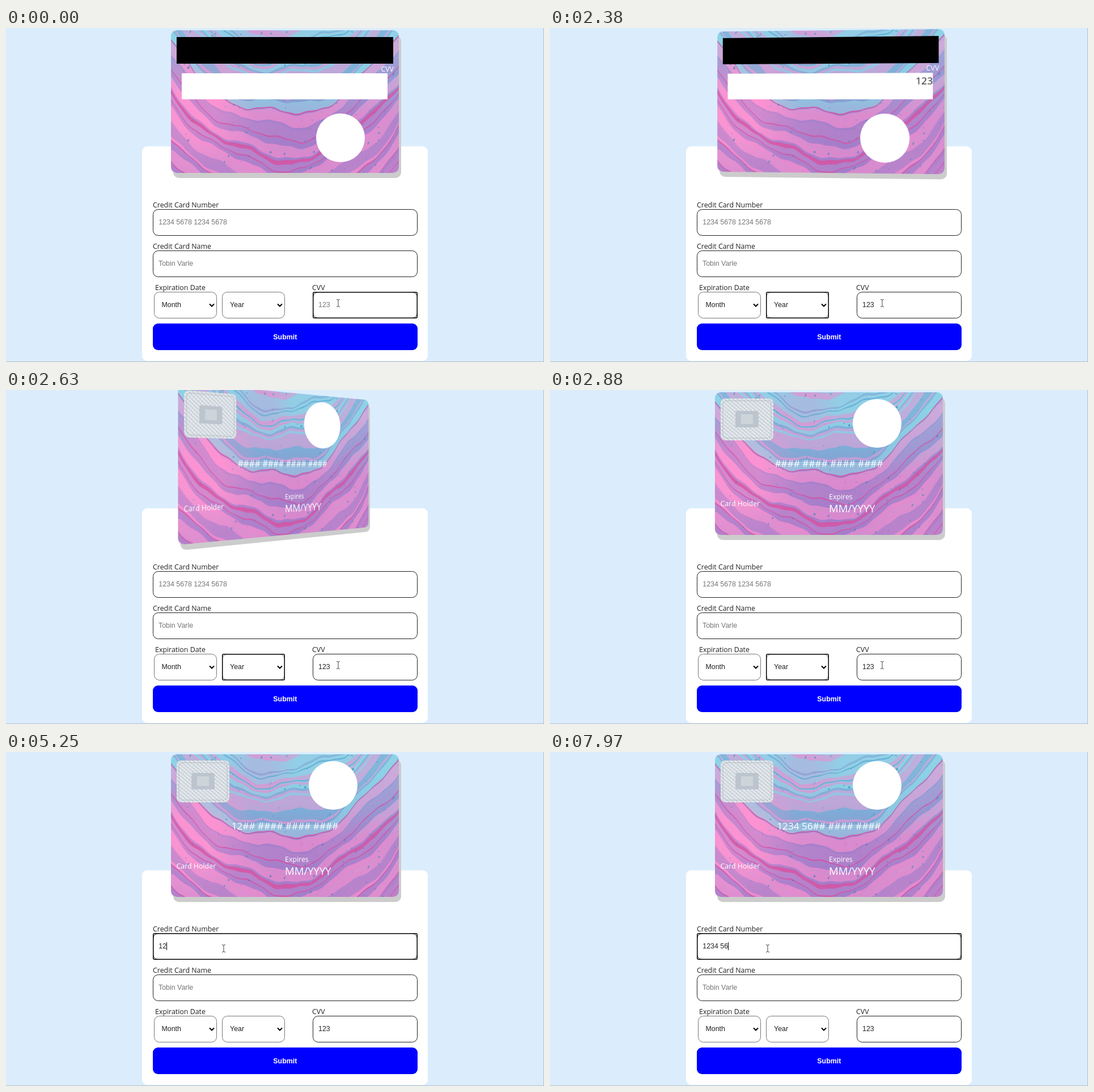
These frames come from a looping animation (949 by 590 pixels, 8 s). An HTML page with a canvas:

```html
<!DOCTYPE html>
<html lang="en">
<head>
<meta charset="utf-8">
<title>Card form</title>
<style>
html, body { margin: 0; width: 100%; height: 100%; overflow: hidden; background: #dbedfc; }
#stage { position: relative; width: 949px; height: 590px; overflow: hidden; }
#stage > svg { position: absolute; left: 0; top: 0; }
text { font: 12.4px "Liberation Sans", Arial, sans-serif; fill: #222; white-space: pre; }
.label, .face text { font-family: "Open Sans", "Noto Sans", sans-serif; }
.face text { fill: #fff; }
.face .big { font-size: 17.2px; }
.face .date { font-size: 18.5px; }
.hint { fill: #757575; }
.field { fill: #fff; stroke: #222; }
.select { stroke: #767676; }
.face {
  position: absolute; left: 291px; top: 4px; width: 402px; height: 252px;
  border-radius: 10px; box-shadow: 4px 9px #ccc; backface-visibility: hidden;
}
.face > * { position: absolute; left: 0; top: 0; border-radius: 10px; }
</style>
</head>
<body>
<div id="stage">
  <svg width="949" height="590">
    <rect x="240" y="209" width="504" height="379" rx="9" fill="#fff"/>
    <path d="M0 589.5H949M948.5 0V590" stroke="#b4bcc4"/>
    <text class="label" x="259" y="317">Credit Card Number</text>
    <text class="label" x="259" y="390">Credit Card Name</text>
    <text class="label" x="263" y="463">Expiration Date</text>
    <text class="label" x="540" y="463">CVV</text>
    <rect class="field" x="259.5" y="320.5" width="466" height="46" rx="9"/>
    <rect class="field" x="259.5" y="393.5" width="466" height="46" rx="9"/>
    <rect class="field select" x="261.5" y="466.5" width="110" height="46" rx="9"/>
    <rect class="field select" x="381.5" y="466.5" width="110" height="46" rx="9"/>
    <rect class="field" x="541.5" y="466.5" width="184" height="46" rx="9"/>
    <rect id="focus" height="45.5" rx="2" fill="none" stroke="#000" stroke-width="1.5"/>
    <text id="number" x="269.3" y="346.5"></text>
    <text class="hint" x="269" y="419.7">Tobin Varle</text>
    <text x="274.5" y="493">Month</text>
    <text x="395" y="493">Year</text>
    <text id="cvv" x="551" y="493"></text>
    <path d="M359 487.5l4 4 4-4M479 487.5l4 4 4-4" fill="none" stroke="#000" stroke-width="2"/>
    <rect x="259" y="522" width="467" height="47" rx="9" fill="#00f"/>
    <text x="492.3" y="549.5" text-anchor="middle" style="fill:#fff;font-weight:bold">Submit</text>
    <rect id="caret" width="1" height="14"/>
  </svg>

  <div class="face" id="back">
    <canvas width="402" height="252"></canvas>
    <svg width="402" height="252">
      <rect x="10" y="12" width="382" height="47"/>
      <text x="393" y="72.5" text-anchor="end">CVV</text>
      <rect x="19" y="76" width="363" height="46" fill="#fff"/>
      <text id="cardCvv" class="big" x="382" y="96" text-anchor="end" style="fill:#222"></text>
      <circle cx="299" cy="190" r="43" fill="#fff"/>
    </svg>
  </div>

  <div class="face" id="front">
    <canvas width="402" height="252"></canvas>
    <svg width="402" height="252" fill="none">
      <defs>
        <pattern id="hatch" width="5" height="5" patternUnits="userSpaceOnUse" patternTransform="rotate(40)">
          <rect width="5" height="5" fill="#cbd3da"/>
          <path d="M0 1H5M1 0V3" stroke="#edf0f3" stroke-width="1.5"/>
        </pattern>
      </defs>
      <rect x="10" y="11" width="93" height="74" rx="8" fill="url(#hatch)"/>
      <rect x="14" y="15" width="85" height="66" rx="6" stroke="#aeb7c0" stroke-dasharray="5 1"/>
      <rect x="36" y="33" width="41" height="29" rx="3" fill="#bcc5ce"/>
      <rect x="46" y="39" width="21" height="17" fill="#cdd4da"/>
      <circle cx="286" cy="55" r="43" fill="#fff"/>
      <text id="cardNumber" class="big" x="201" y="132.5" text-anchor="middle"></text>
      <text x="9.5" y="201.5">Card Holder</text>
      <text x="201" y="189.5">Expires</text>
      <text class="date" x="201" y="212.5">MM/YYYY</text>
    </svg>
  </div>

  <svg width="949" height="590">
    <path id="pointer" d="M-3-6.5Q0-6.5 0-5V5Q0 6.5-3 6.5M3-6.5Q0-6.5 0-5M3 6.5Q0 6.5 0 5" fill="none" stroke="#444"/>
  </svg>
</div>

<script>
const LOOP = 8000;
const $ = id => document.getElementById(id);

// Marble: soft regions of colour, translucent valley-shaped veins and seeded droplets.
function paintMarble(canvas) {
  const c = canvas.getContext('2d'), W = 402, H = 252;
  let seed = 7;
  const random = () => (seed = seed * 16807 % 2147483647) / 2147483647;

  const base = c.createLinearGradient(0, 0, 0, H);
  base.addColorStop(.1, '#8ecde5');
  base.addColorStop(.4, '#88b6dc');
  base.addColorStop(.6, '#b188cc');
  base.addColorStop(1, '#c586cb');
  c.fillStyle = base;
  c.fillRect(0, 0, W, H);

  const tint = (x, y, radius, rgb) => {
    const g = c.createRadialGradient(x, y, 0, x, y, radius);
    g.addColorStop(.35, `rgb(${rgb})`);
    g.addColorStop(1, `rgba(${rgb},0)`);
    c.fillStyle = g;
    c.fillRect(0, 0, W, H);
  };
  tint(40, 140, 110, '250,150,210');
  tint(155, 30, 65, '185,165,215');
  tint(230, 215, 90, '170,128,200');

  const edge = (x, depth) => 225 + depth - .0032 * (x - 195) ** 2 + 8 * Math.sin(x * .035 + depth * .02)
    + 3 * Math.sin(x * .08 - depth * .045) + .8 * Math.sin(x * .21 + depth * .1);
  const vein = (depth, thickness, color) => {
    c.beginPath();
    for (let x = 0; x <= W; x += 2) c.lineTo(x, edge(x, depth));
    for (let x = W; x >= 0; x -= 2) c.lineTo(x, edge(x, depth + thickness));
    c.fillStyle = color;
    c.fill();
  };
  const upper = ['140,215,232', '120,165,212', '232,150,212', '150,208,232'];
  const lower = ['255,145,210', '160,125,204', '245,150,212', '178,130,204'];
  for (let depth = -290; depth < 190;) {
    const thickness = 3 + 16 * random() ** 2;
    const family = depth < -85 ? upper : lower;
    vein(depth, thickness, `rgba(${family[Math.floor(4 * random())]},.55)`);
    if (random() < .3) vein(depth, 1.5 + 2 * random(), depth < -110 ? 'rgba(70,160,205,.6)' : 'rgba(222,75,155,.7)');
    depth += thickness;
  }

  for (let i = 0; i < 130; i++) {
    c.beginPath();
    c.ellipse(W * random(), H * random(), .5 + 1.8 * random() ** 3, .6 + 2.8 * random() ** 3, .5, 0, 7);
    c.fillStyle = 'rgba(62,132,182,.65)';
    c.fill();
  }
}
document.querySelectorAll('canvas').forEach(paintMarble);

const FLIP_START = 2357, FLIP_TIME = 540;
function turn(id, from, to) {
  const pose = angle => ({ transform: `perspective(933px) rotateY(${angle}deg)` });
  const animation = $(id).animate([pose(from), pose(to)], { duration: FLIP_TIME, easing: 'ease', fill: 'both' });
  animation.pause();
  return animation;
}
const turns = [turn('back', 0, -180), turn('front', 180, 0)];

const cvvTyping = [[0, ''], [760, '1'], [890, '12'], [1430, '123']];
const numberTyping = [[0, ''], [5130, '1'], [5250, '12'], [5650, '123'], [5910, '1234 '],
  [6570, '1234 5'], [6820, '1234 56'], [7720, '1234 567'], [7970, '1234 56']];
const focusBoxes = [[0, 541.75, 466.75, 183.5], [2380, 381.75, 466.75, 109.5], [4180, 259.75, 320.75, 465.5]];
const caretShown = [[120, 640], [760, 1980], [4180, 4720], [5130, 6440], [6570, 7330], [7720, LOOP]];
const pointerPath = [[0, 586, 486], [3010, 520, 470], [3140, 408, 444], [3260, 374, 392], [3390, 354, 355],
  [3500, 347, 340], [3640, 347, 333], [4460, 358, 337], [4590, 375, 344], [4720, 384, 347]];

const latest = (steps, t) => steps.findLast(step => step[0] <= t).slice(1);

function setField(id, value, hint) {
  $(id).textContent = value || hint;
  $(id).setAttribute('class', value ? '' : 'hint');
}

function placeCaret(t, id, value, y) {
  const shown = caretShown.some(([from, to]) => t >= from && t < to);
  const width = value ? $(id).getComputedTextLength() : 0;
  $('caret').setAttribute('x', Math.round(+$(id).getAttribute('x') + width - .5));
  $('caret').setAttribute('y', y);
  $('caret').style.display = shown ? '' : 'none';
}

function render(t) {
  // The flip is seen at eight poses a second.
  const sampled = 2380 + Math.floor((t - 2380) / 125) * 125;
  const flipped = Math.max(0, Math.min(FLIP_TIME, sampled - FLIP_START));
  for (const animation of turns) animation.currentTime = flipped;

  const [cvv] = latest(cvvTyping, t), [number] = latest(numberTyping, t);
  setField('cvv', cvv, '123');
  setField('number', number, '1234 5678 1234 5678');
  $('cardCvv').textContent = cvv;
  $('cardNumber').textContent = number.replace(' ', '').padEnd(16, '#').match(/.{4}/g).join(' ');

  const [x, y, width] = latest(focusBoxes, t);
  Object.entries({ x, y, width }).forEach(([name, value]) => $('focus').setAttribute(name, value));
  if (t < 2380) placeCaret(t, 'cvv', cvv, 482);
  else placeCaret(t, 'number', number, 336);

  $('pointer').setAttribute('transform', `translate(${latest(pointerPath, t)})`);
}

function frame() {
  render(performance.now() % LOOP);
  requestAnimationFrame(frame);
}
frame();
</script>
</body>
</html>
```
